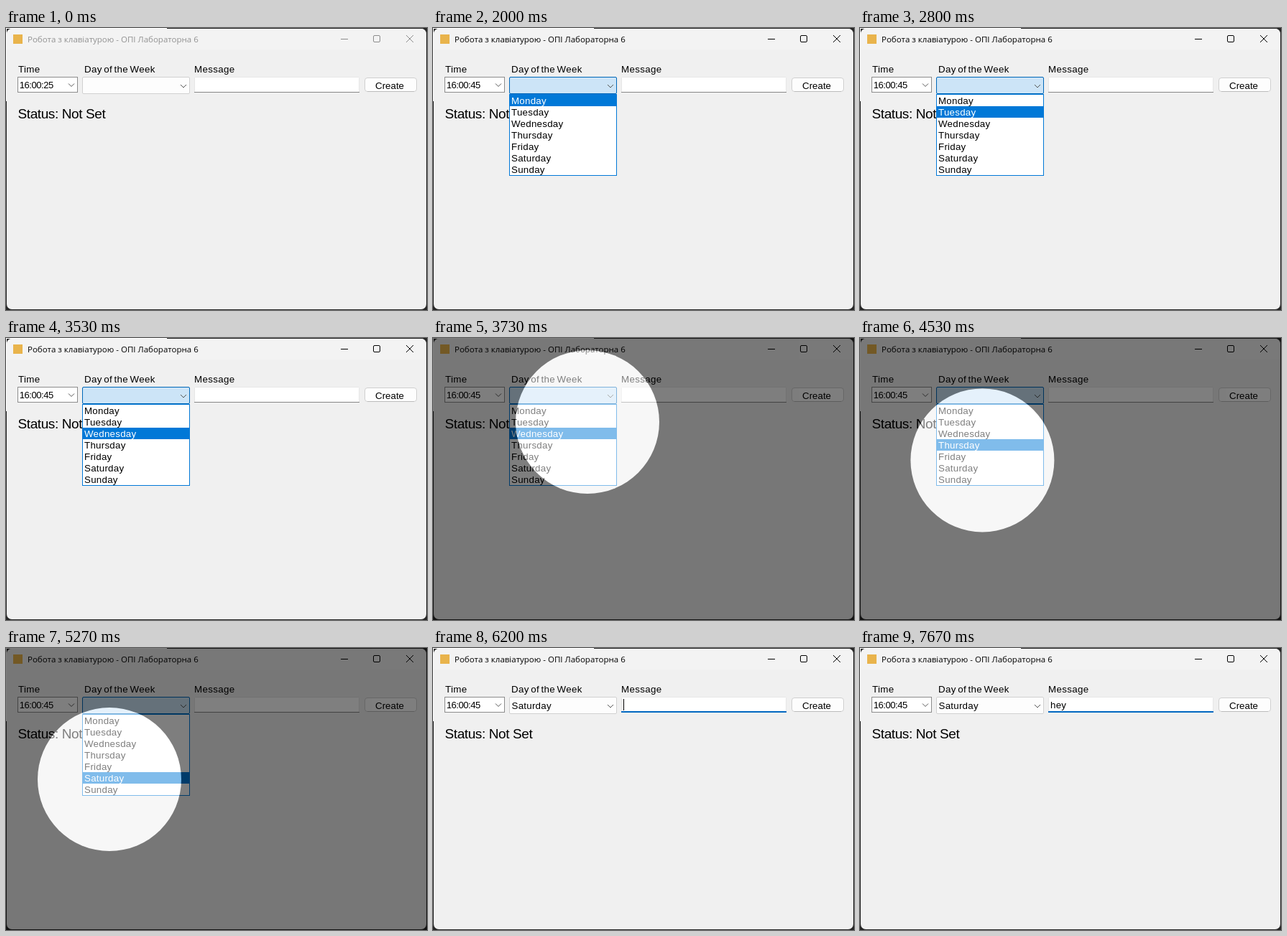
An HTML page for the animation above (8 s loop, 586 by 393 pixels).

```html
<!DOCTYPE html>
<html lang="uk">
<head>
<meta charset="utf-8">
<title>Alarm form</title>
<style>
  html, body { margin: 0; width: 100%; height: 100%; overflow: hidden; background: #262626; }
  svg { display: block; width: 586px; height: 393px; }
  text { font: 13.33px "Liberation Sans", Arial, sans-serif; fill: #000; white-space: pre; }
  .label { letter-spacing: .35px; word-spacing: -1.6px; }
  .item { letter-spacing: .25px; }
  .title { font: 11.5px "Open Sans", "Noto Sans", sans-serif; }
  .clock { font-size: 13px; letter-spacing: -.45px; }
  .status { font-size: 19px; letter-spacing: -.4px; }
  .line { fill: none; stroke: #000; }
  .chevron { fill: none; stroke: #555; }
  .inactive .title { fill: #929292; }
  .inactive .line { stroke: #8c8c8c; }
  .crisp { shape-rendering: crispEdges; }
</style>
</head>
<body>
<svg viewBox="0 0 586 393">
  <defs><clipPath id="listClip"><rect id="listArea" x="106" y="92" width="150"/></clipPath></defs>

  <rect width="586" height="393" fill="#262626"/>
  <path d="M0 102V0H224V1H1V102Z" fill="#fff"/>
  <rect x="1" y="1" width="584" height="391" rx="7" fill="#f0f0f0"/>
  <path d="M1 30V8a7 7 0 0 1 7-7H578a7 7 0 0 1 7 7V30Z" fill="#f3f3f3"/>

  <g id="bar">
    <rect x="10" y="9" width="13" height="13" fill="#e9b44c"/>
    <text class="title" x="30" y="20">Робота з клавіатурою - ОПІ Лабораторна 6</text>
    <path class="line" d="M466 15.5H476"/>
    <rect class="line" x="511.5" y="10.5" width="9" height="9" rx="1.5"/>
    <path class="line" d="M557 10l10 10M567 10l-10 10"/>
  </g>

  <text class="label" x="17" y="62">Time</text>
  <text class="label" x="109" y="62">Day of the Week</text>
  <text class="label" x="262" y="62">Message</text>
  <text class="status" x="16.5" y="126">Status: Not Set</text>

  <rect id="timeBox" x="16.5" y="68.5" width="83" height="21" fill="#fff"/>
  <rect id="secondsMark" class="crisp" x="52" y="74" width="14" height="11" fill="#0078d7"/>
  <text class="clock" x="18.8" y="84">16:00:<tspan id="seconds"></tspan></text>
  <path class="chevron" d="M87 77.5l4 4 4-4"/>

  <rect x="106.5" y="68.5" width="149" height="23" rx="1.5" fill="#fdfdfd" stroke="#d0d0d0"/>
  <rect id="dayHot" x="106.5" y="68.5" width="149" height="23" rx="1.5" stroke="#0067b8"/>
  <text id="day" class="item" x="109.5" y="85">Saturday</text>
  <path class="chevron" d="M243 79l4 4 4-4"/>

  <rect x="262.5" y="68.5" width="229" height="21" rx="1" fill="#fff" stroke="#e6e6e6"/>
  <rect id="underline" class="crisp" x="262" width="230"/>
  <text id="message" class="item" x="265" y="84"></text>
  <rect id="caret" class="crisp" y="71" width="1" height="16"/>

  <rect x="499.5" y="69.5" width="72" height="19" rx="3.5" fill="#fdfdfd" stroke="#d0d0d0"/>
  <path d="M503 88.5H568" stroke="#bcbcbc"/>
  <text x="514" y="85">Create</text>

  <g id="list" clip-path="url(#listClip)">
    <rect x="106.5" y="92.5" width="149" height="113" fill="#fff" stroke="#0078d7"/>
    <rect id="rowMark" class="crisp" x="107" width="148" height="16" fill="#0078d7"/>
    <g id="rows"></g>
  </g>

  <g id="spotlight">
    <rect width="586" height="393"/>
    <circle id="beam" fill="#fff"/>
  </g>
</svg>

<script>
const FPS = 15, FRAMES = 120;
const ROW_TOP = 93, ROW_HEIGHT = 16;

// Moments of the scene, in frames
const ACTIVATE = 6, TYPE_TIME = 17, HOVER = 20, OPEN = 26, DIM = 53, CLOSE = 80;
const FOCUS_MESSAGE = 93, TYPE_START = 104, TYPE_END = 107, BLINK = 8;

// Mouse path as [frame, x, y], linear in between
const pointer = [
  [28, 215, 84], [30, 215, 101], [32, 215, 101], [35, 215, 165], [37, 215, 165],
  [41, 215, 97], [45, 215, 200], [47, 215, 165], [50, 215, 180], [53, 216, 132], [55, 215, 117],
  [61, 180, 186], [64, 120, 213], [69, 204, 142], [71, 204, 142], [78, 144, 183]
];

const $ = id => document.getElementById(id);
const set = (id, attrs) => {
  for (const name in attrs) $(id).setAttribute(name, attrs[name]);
};
const show = (id, on) => set(id, { visibility: on ? "visible" : "hidden" });
const clamp = k => Math.max(0, Math.min(1, k));
const typed = (word, start, pace, frame) =>
  word.slice(0, Math.max(0, Math.floor((frame - start) / pace) + 1));

function pointerAt(frame) {
  const next = pointer.findIndex(key => key[0] > frame);
  if (next < 1) return pointer.at(next).slice(1);
  const [f0, x0, y0] = pointer[next - 1], [f1, x1, y1] = pointer[next];
  const k = (frame - f0) / (f1 - f0);
  return [x0 + (x1 - x0) * k, y0 + (y1 - y0) * k];
}

const rows = ["Monday", "Tuesday", "Wednesday", "Thursday", "Friday", "Saturday", "Sunday"].map((name, i) => {
  const row = document.createElementNS("http://www.w3.org/2000/svg", "text");
  row.textContent = name;
  row.setAttribute("class", "item");
  row.setAttribute("x", 109);
  row.setAttribute("y", ROW_TOP + 13 + ROW_HEIGHT * i);
  return $("rows").appendChild(row);
});

function drawTime(frame) {
  const focused = frame >= ACTIVATE && frame < OPEN;
  set("timeBox", { stroke: focused ? "#0078d7" : "#8c8c8c" });
  show("secondsMark", focused);
  $("seconds").textContent = typed("45", TYPE_TIME, 2, frame) || "25";
  $("seconds").style.fill = focused ? "#fff" : "#000";
}

function drawDay(frame) {
  const closed = frame >= CLOSE;
  set("dayHot", {
    fill: frame < OPEN ? "#e5f1fb" : "#cce4f7",
    opacity: closed ? 0 : clamp((frame - HOVER) / 2)
  });
  show("day", closed);
  show("list", frame >= OPEN && !closed);
  set("listArea", { height: 114 * clamp((frame - OPEN + 1) / 2) });

  const y = pointerAt(frame)[1];
  const current = Math.min(rows.length - 1, Math.floor((y - ROW_TOP) / ROW_HEIGHT));
  set("rowMark", { y: ROW_TOP + ROW_HEIGHT * current, visibility: current < 0 ? "hidden" : "inherit" });
  rows.forEach((row, i) => row.style.fill = i === current ? "#fff" : "#000");
}

function drawMessage(frame) {
  const focused = frame >= FOCUS_MESSAGE;
  const text = typed("hey", TYPE_START, 1.5, frame);
  const lastInput = frame < TYPE_START ? FOCUS_MESSAGE : Math.min(frame, TYPE_END);
  set("underline", focused ? { y: 88, height: 2, fill: "#0067c0" } : { y: 89, height: 1, fill: "#868686" });
  $("message").textContent = text;
  set("caret", { x: Math.round(265 + 7.4 * text.length) });
  show("caret", focused && Math.floor((frame - lastInput) / BLINK) % 2 === 0);
}

function drawSpotlight(frame) {
  const k = Math.min(clamp((frame - DIM) / 3), clamp((CLOSE + 1 - frame) / 2));
  const [cx, cy] = pointerAt(frame - 1); // trails the mouse
  set("spotlight", { opacity: k / 2 });
  set("beam", { cx, cy, r: 100 * Math.max(k, .1) ** -1.3 });
}

function draw(frame) {
  $("bar").setAttribute("class", frame < ACTIVATE ? "inactive" : "");
  drawTime(frame);
  drawDay(frame);
  drawMessage(frame);
  drawSpotlight(frame);
}

let last = -1;
function tick() {
  // small lead keeps rounding from delaying a step
  const frame = Math.floor((performance.now() + 5) * FPS / 1000) % FRAMES;
  if (frame !== last) draw(last = frame);
  requestAnimationFrame(tick);
}
tick();
</script>
</body>
</html>
```
